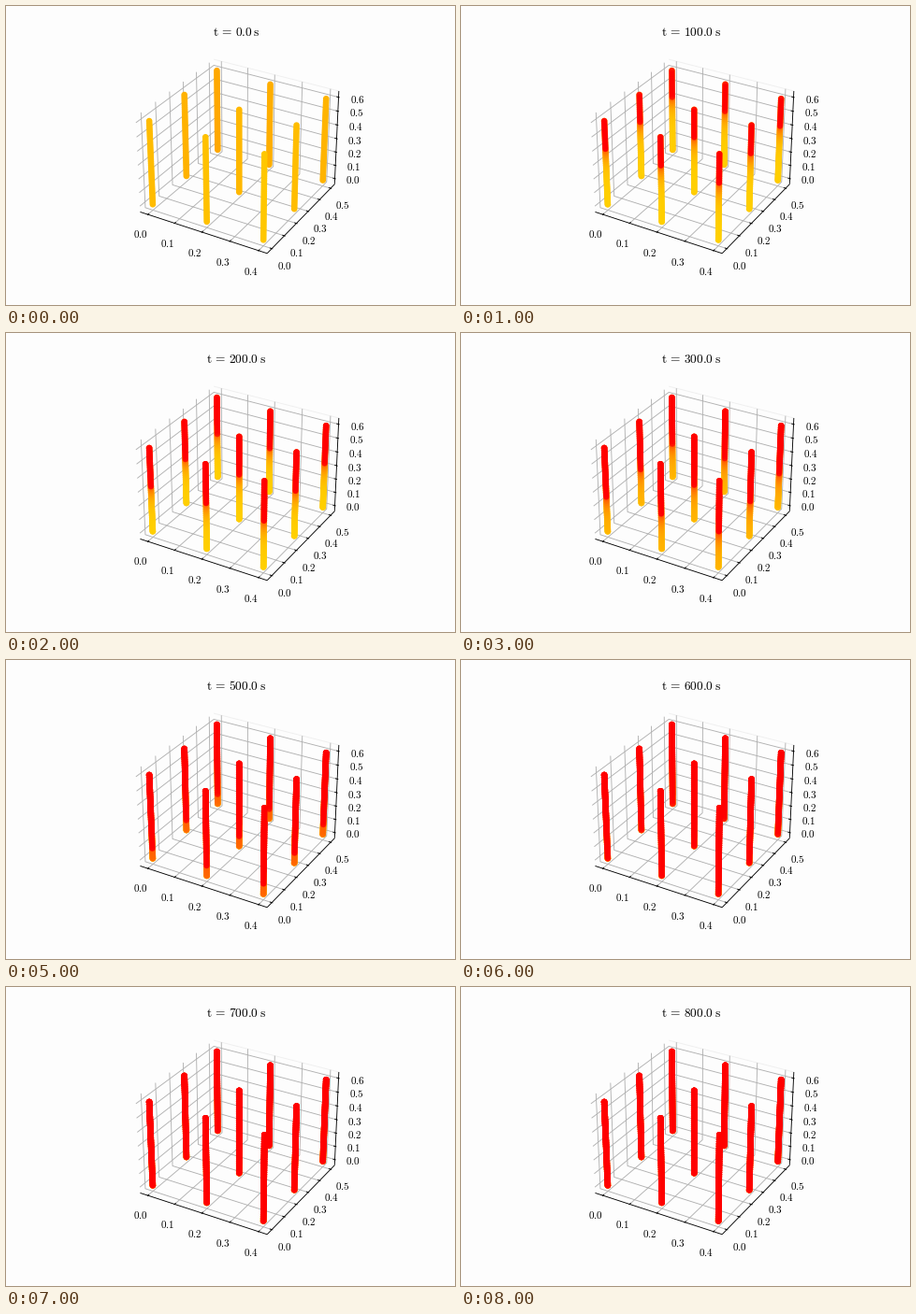
These frames come from a looping animation (480x320 px, 9000 ms). A matplotlib script:

```python
import numpy as np
import matplotlib.pyplot as plt
from matplotlib.animation import FuncAnimation

plt.rcParams["mathtext.fontset"] = "cm"

W, H, DPI = 480, 320, 80
STEPS = 9
BG = "#fdfdfd"

# Unit-cube coordinates: data spans -0.5..0.5, the box reaches out to EDGE.
SIZE = np.array([1.039, 1.039, 0.7793])
EDGE = 0.5 * 1.1 * 25 / 24
ELEV, AZIM, DIST = np.radians(30), np.radians(-60), 10
SCALE, CENTER = 1305.9, (249.27, 155.93)

RIGHT = np.array([-np.sin(AZIM), np.cos(AZIM), 0])
UP = np.array([-np.sin(ELEV) * np.cos(AZIM), -np.sin(ELEV) * np.sin(AZIM), np.cos(ELEV)])
VIEW = np.array([np.cos(ELEV) * np.cos(AZIM), np.cos(ELEV) * np.sin(AZIM), np.sin(ELEV)])


def project(points):
    p = np.asarray(points, float) * SIZE
    k = SCALE / (DIST - p @ VIEW)
    return np.stack([CENTER[0] + k * (p @ RIGHT), CENTER[1] - k * (p @ UP)], -1)


fig = plt.figure(figsize=(W / DPI, H / DPI), dpi=DPI, facecolor=BG)
ax = fig.add_axes([0, 0, 1, 1])
ax.set_xlim(0, W)
ax.set_ylim(H, 0)
ax.axis("off")


def line(points, color, z, lw=0.8):
    ax.plot(*project(points).T, color=color, lw=lw, zorder=z,
            solid_capstyle="butt", solid_joinstyle="round")


def ticks(count, top, path, base, out, tick_dir):
    """Grid lines, tick marks and labels along one axis."""
    for i in range(count):
        v = 0.1 * i / top - 0.5
        line(path(v), "#b0b0b0", 1)
        p, step = np.array(base(v)), np.array(tick_dir)
        line([p - 0.0183 * step, p + 0.0092 * step], "black", 2)
        x, y = project(p + 0.1117 * np.array(out))
        ax.text(x, y + 4.5, f"${0.1 * i:.1f}$", size=10, ha="center", va="center")


E = EDGE
line([(-E, E, E), (E, E, E)], "#efefef", 0.5)
ticks(5, 0.4, lambda v: [(v, -E, -E), (v, E, -E), (v, E, E)],
      lambda v: (v, -E, -E), (0, -1, -1), (0, -1, 0))
ticks(6, 0.5, lambda v: [(E, v, -E), (-E, v, -E), (-E, v, E)],
      lambda v: (E, v, -E), (1, 0, -1), (1, 0, 0))
ticks(7, 0.6, lambda v: [(-E, -E, v), (-E, E, v), (E, E, v)],
      lambda v: (E, E, v), (1, 1, 0), (1, 0, 0))
for a, b in [((-E, -E, -E), (E, -E, -E)),
             ((E, -E, -E), (E, E, -E)),
             ((E, E, -E), (E, E, E))]:
    line([a, b], "black", 2)

# Nine rods, painted from far to near.
side = np.linspace(-0.5, 0.5, 3)
rods = np.stack(np.meshgrid(side, side, np.linspace(-0.5, 0.5, 41)), -1).reshape(-1, 3)
rods = rods[np.argsort((rods * SIZE) @ VIEW)]
near = (rods * SIZE) @ VIEW
near = (near - near.min()) / np.ptp(near)
ground = (rods * SIZE)[:, :2] @ VIEW[:2]
ground = (ground - ground.min()) / np.ptp(ground)
below = 0.5 - rods[:, 2]
spots = project(rods)

FRONT = [0, 0.33, 0.45, 0.6, 0.74, 0.89, 1.1, 1.1, 1.1]
COOL = [0.76, 0.82, 0.82, 0.72, 0.58, 0.42, 0, 0, 0]


def colors(k):
    """Yellow below, red above the heat front."""
    if k == 0:
        green = 0.66 + 0.12 * ground
    else:
        gap = below - FRONT[k]
        green = COOL[k] - (COOL[k] - 0.38) * np.exp(-np.maximum(gap, 0) / 0.12)
        green = np.where(gap < 0, 0, green)
    alpha = np.ones_like(near) if k == 0 else 0.6 + 0.4 * near
    return np.stack([np.ones_like(near), green, np.zeros_like(near), alpha], -1)


# Each step is painted over the earlier ones.
layers = [ax.scatter(*spots.T, s=20, c=colors(k), lw=1.5, zorder=3 + k)
          for k in range(STEPS)]
title = ax.text(246, 31.7, "", size=12, ha="center", va="baseline")


def update(k):
    for i, layer in enumerate(layers):
        layer.set_visible(i <= k)
    title.set_text(rf"$\mathrm{{t}}\,=\,{100 * k:.1f}\:\mathrm{{s}}$")
    return layers + [title]


anim = FuncAnimation(fig, update, frames=STEPS, interval=1000, repeat=True, repeat_delay=0)
plt.show()
```
